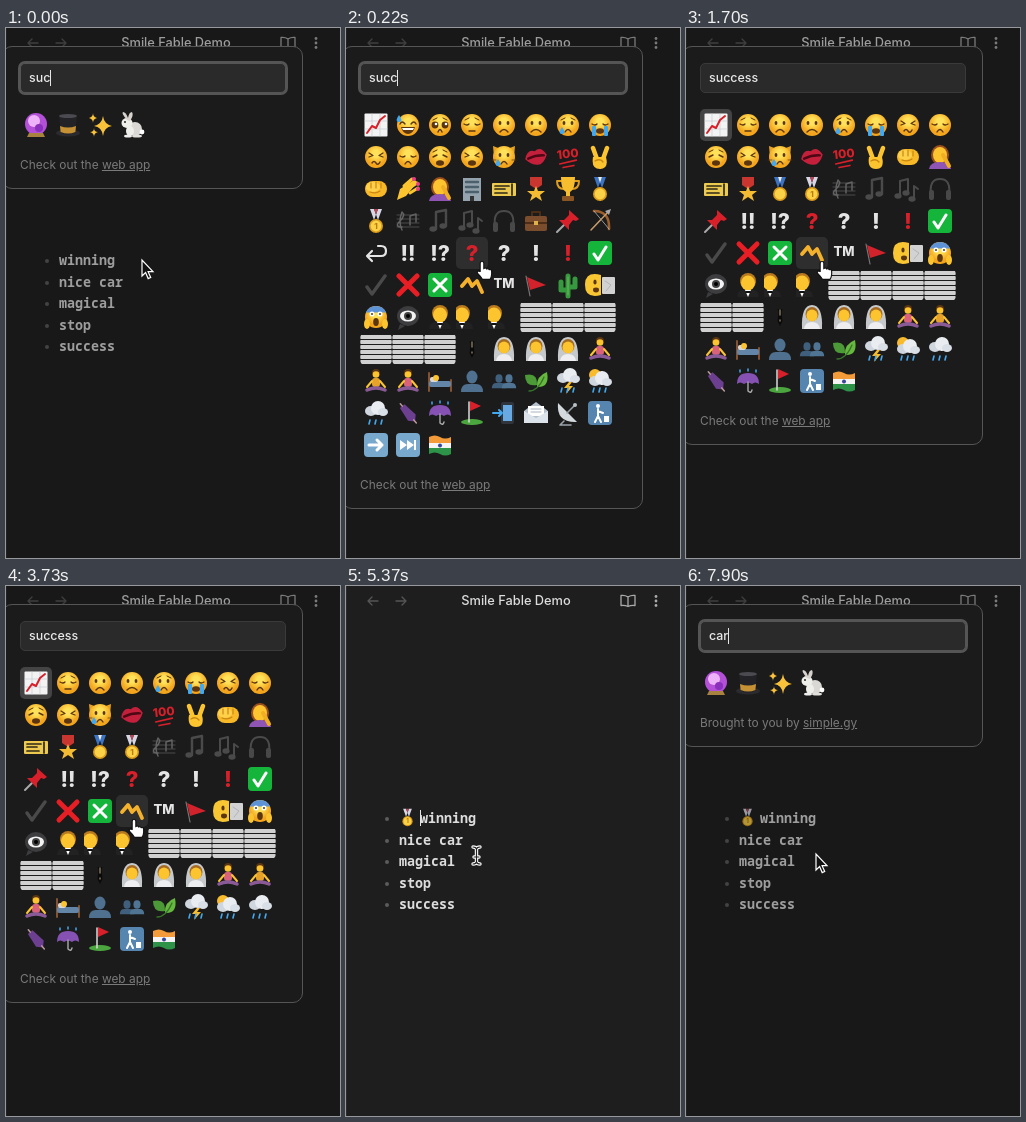
Recreate the animation shown at these times as an HTML page. Size 334 by 530 pixels, loop 8 s.

```html
<!DOCTYPE html>
<html lang="en">
<head>
<meta charset="utf-8">
<title>Emoji picker</title>
<style>
html, body { margin: 0; width: 100%; height: 100%; overflow: hidden; background: #1e1e1e; }
#stage { position: relative; width: 334px; height: 530px; overflow: hidden; background: #1e1e1e; font: 12.6px/16px Inter, sans-serif; color: #dcdcdc; }
#stage > *, #popup > * { position: absolute; }
#edge { left: 0; top: 0; width: 1px; height: 530px; background: #2c2c2c; }
#title { left: 70px; width: 200px; top: 7px; text-align: center; font-size: 12.8px; font-weight: 500; }
#icons { left: 0; top: 0; }
.row { left: 53px; height: 16px; font: 600 13.33px/16px "Noto Sans Mono", monospace; white-space: pre; }
.dot { left: 39px; width: 4px; height: 4px; border-radius: 2px; background: #5c5c5c; }
#medal { left: 52px; top: 222px; width: 19px; height: 19px; }
.caret { width: 1px; height: 16px; background: #e6e6e6; }
#dim { inset: 0; background: #0a0a0a; }
#popup { inset: 0; }
#panel { left: -4px; top: 18px; width: 299px; background: #1b1b1b; border: 1px solid #555; border-radius: 10px; }
#field { left: 14px; top: 35px; width: 256px; height: 28px; padding-left: 8px; border: 1px solid #3a3a3a; border-radius: 5px; background: #2a2a2a; font-size: 12.4px; font-weight: 500; line-height: 28px; color: #e8e8e8; white-space: pre; }
#field .caret { display: inline-block; vertical-align: middle; margin-top: -1px; }
#hint { color: #6a6a6a; font-weight: 400; }
#grid { left: 14px; top: 81px; width: 256px; display: flex; flex-wrap: wrap; }
#grid svg { width: 32px; height: 32px; border-radius: 5px; }
#grid .hover { background: #2e2e2e; }
#grid .focus { background: #444; }
#foot { left: 14px; font-size: 11.9px; color: #7a7a7a; white-space: pre; }
#pointer { left: 0; top: 0; overflow: visible; }
</style>
</head>
<body>
<div id="stage">
  <svg width="0" height="0"><defs><radialGradient id="sun" cy=".35"><stop offset=".3" stop-color="#ffe259"/><stop offset="1" stop-color="#f3a51d"/></radialGradient></defs></svg>
  <div id="edge"></div>
  <svg id="icons" width="334" height="30"></svg>
  <div id="title">Smile Fable Demo</div>
  <svg id="medal" viewBox="-13 -13 26 26"></svg>
  <div id="caret" class="caret"></div>
  <div id="dim"></div>
  <div id="popup">
    <div id="panel"></div>
    <div id="field"><span id="query"></span><span id="mark" class="caret"></span><span id="hint">Search for emojis by keyword</span></div>
    <div id="grid"></div>
    <div id="foot"></div>
  </div>
  <svg id="pointer" width="1" height="1"></svg>
</div>
<script>
const $ = id => document.getElementById(id);
const el = (tag, attrs, body = '') =>
  `<${tag} ${Object.entries(attrs).map(([k, v]) => `${k}="${v}"`).join(' ')}>${body}</${tag}>`;
const disc = (cx, cy, rx, fill, ry = rx) => el('ellipse', { cx, cy, rx, ry, fill });
const box = (x, y, width, height, fill, rx = 0) => el('rect', { x, y, width, height, fill, rx });
const shape = (d, fill) => el('path', { d, fill });
const line = (d, stroke, w = 2) => el('path', { d, stroke, fill: 'none', 'stroke-width': w, 'stroke-linecap': 'round', 'stroke-linejoin': 'round' });
const word = (s, fill, size = 22, y = 8) => el('text', { y, fill, 'text-anchor': 'middle', style: `font:800 ${size}px Inter,sans-serif` }, s);
const move = (x, y, body, more = '') => el('g', { transform: `translate(${x} ${y}) ${more}` }, body);

// emoji parts
const brown = '#5a3510', skin = '#fcc42f', blue = '#43a8ee', red = '#d8202b', pale = '#e4e4e4', dark = '#4a4a4a';
const face = (...parts) => disc(0, 0, 11, 'url(#sun)') + parts.join('');
const dots = disc(-4, -2, 1.4, brown, 1.9) + disc(4, -2, 1.4, brown, 1.9);
const shut = line('M-8-1q3 2 5 0M3-1q2 2 5 0', brown, 1.3);
const squint = line('M-7-4l4 2.5-4 1.5M7-4l-4 2.5 4 1.5', brown, 1.3);
const brows = line('M-7-5l4-2M7-5l-4-2', brown, 1);
const sad = w => line(`M${-w} 7q${w}-5 ${2 * w} 0`, brown, 1.4);
const gape = disc(0, 6, 4, brown, 2.8);
const tear = (x, y) => shape(`M${x} ${y}q-5 7 0 7t0-7z`, blue);
const medal = (ribbon, tip) => shape('M-6-12h4l4 11h-4zM6-12h-4l-4 11h4z', ribbon) + shape('M-2-12h4l-2 6z', tip) + disc(0, 5, 7, '#d99a1a') + disc(0, 5, 5.4, '#fbd147');
const suit = disc(0, -4, 8, '#b97a1d', 8) + disc(0, -2, 7, skin, 7.5) + shape('M-11 12q0-6 6-7h10q6 1 6 7z', '#222') + shape('M-3 5h6l-3 7z', '#fff') + line('M-2 7h4', '#111', 2);
const veil = shape('M-10 12Q-11-12 0-12T10 12z', '#c6c9cc') + disc(0, -3, 6.5, '#a36a20', 7) + disc(0, -1.5, 5.6, skin, 6) + shape('M-8 12q1-7 8-7t8 7z', '#eeeef0');
const yoga = top => disc(0, -8, 4, brown) + disc(0, -6.5, 3.3, skin) + box(-4, -3, 8, 9, top, 3) + line('M-4 0l-5 6M4 0l5 6', skin, 2) + line('M-9 9q9-4 18 0', '#8a5a97', 3.5);
const bust = (x, c, k = 1) => move(x, 0, disc(0, -4, 5.5, c, 6.5) + shape('M-11 11q0-8 7-8h8q7 0 7 8z', c), `scale(${k})`);
const cloud = (y = 0) => move(0, y, disc(-5, 0, 6, '#cfd6de', 5) + disc(2, -3, 7, '#e9edf2') + disc(7, 1, 5, '#d9dfe6', 4));
const drops = line('M-6 7l-1 4M0 7l-1 4M6 7l-1 4', blue, 1.6);
const tile = (c, body) => box(-12, -12, 24, 24, c, 4) + body;
const bars = [0, 1, 2, 3, 4, 5].map(i => box(-15.7, -14 + i * 5, 31.4, 4, '#d0d0d0', .8)).join('');
const stem = (x, y) => disc(x, y, 3.6, dark, 2.8);

const art = {
  ball: disc(0, -1, 11, '#b44fd8') + disc(-2, -4, 6, '#eeb2f8') + disc(3, 3, 4, '#8a30bd') + shape('M-7 8h14l2 4h-18z', '#a8823f'),
  hat: disc(0, 8, 12, '#2b2b2f', 3.6) + shape('M-9-9h18l-2 17q-7 3-14 0z', '#232327') + shape('M-8 1q8 3 16 0l-.6 6q-7 3-14.800 0z', '#c59134') + disc(0, -9, 9, '#4a4a50', 2),
  sparkles: shape('M3-9q1 8 9 10-8 1-9 10-1-9-9-10 8-2 9-10zM-7-12q0 4 4 5-4 1-4 5 0-4-4-5 4-1 4-5zM-6 3q0 4 4 4-4 1-4 5 0-4-4-5 4 0 4-4z', '#f9c23a'),
  rabbit: disc(3, 4, 7, '#dad8d4', 7) + disc(-5, -2, 5.5, '#eeeeea', 5) + shape('M-5-5q-6-7-4-8 3 0 5 6 1-6 4-6 2 3-2 9z', '#d8d2ce') + disc(-7, -3, 1, '#222') + disc(-2, 6, 4, '#eeeeea', 5) + disc(-4, 11, 4, '#eee', 1.6) + disc(10, 7, 2.4, '#fff') + disc(5, 11, 5, '#e2e0dc', 1.6),
  chart: box(-11.5, -11.5, 23, 23, '#f3f3f3', 1) + line('M-11-4h22M-11 4h22M-4-11v22M4-11v22', '#c4cbd2', .7) + line('M-9 8l5-7 4 2 4-8 5-4', red, 2),
  sweat: face(line('M-8-1q2-4 5 0M3-1q3-4 5 0', brown, 1.4), shape('M-7 2h14q-2 7-7 7t-7-7z', brown), shape('M-6 3h12l-1 2h-10z', '#fff'), tear(-9, -10)),
  plead: face(disc(-5, 0, 3.4, brown), disc(5, 0, 3.4, brown), disc(-4, -1, 1.3, '#fff'), disc(6, -1, 1.3, '#fff'), sad(2), brows),
  pensive: face(shut, line('M-3 6h6', brown, 1.4), brows),
  frown: face(dots, sad(4)),
  glum: face(dots, sad(5)),
  cry: face(dots, sad(3), tear(-6, 2), brows),
  sob: face(shut, gape, box(-8, 1, 4, 10, blue, 1), box(4, 1, 4, 10, blue, 1)),
  persevere: face(squint, line('M-4 6q2-3 4 0t4-1', brown, 1.4)),
  disappointed: face(shut, sad(3)),
  weary: face(line('M-7 0l4-2M7 0l-4-2', brown, 1.4), brows, gape),
  tired: face(squint, gape),
  cat: shape('M-11-11l8 3-7 8zM11-11l-8 3 7 8z', '#e8a21f') + face(dots, sad(3), tear(-6, 2), line('M-12 3h4M8 3h4', brown, .7)),
  kiss: move(0, 0, shape('M-11 0q4-10 11-6 7-4 11 6-5 9-11 8t-11-8z', '#c4203c') + line('M-8 0q8-2 16 0', '#4d0814', 2.4), 'rotate(-12)'),
  hundred: move(0, 0, word('100', red, 12, 1) + line('M-9 6l17-2M-6 10l11-1', red, 1.6), 'rotate(-6)'),
  peace: line('M-3 2l-4-11M3 2l4-11', skin, 4.5) + shape('M-7 0h13q3 12-6 12t-7-12z', skin) + line('M-5 4q5-3 8 1', '#c98714', 1.4),
  fist: box(-11, -8, 22, 16, '#f8b928', 8) + disc(-3, -2, 7, '#ffd04a', 5) + line('M-5-6v5M0-7v6M5-6v5M-6 3q6 2 10-1', '#c98714', 1.2),
  nails: shape('M-11 11l3-11 14-9q5 1 1 5l-9 11z', skin) + line('M-4-3l8-7M0 0l9-6M2 4l8-5', skin, 3) + disc(6, -10, 2, '#e83e8c') + disc(10, -5, 2, '#e83e8c') + disc(10, 0, 2, '#e83e8c'),
  palm: disc(0, -2, 9, '#9a4e1c', 10) + disc(0, -2, 7, skin, 8) + shape('M-11 12q1-7 11-7t11 7z', '#8e55b5') + line('M9 9L3-2', '#f0ae22', 4),
  office: box(-9, -11, 18, 23, '#94a3ad') + line('M-6-7h12M-6-2h12M-6 3h12', '#4c606e', 2.4) + box(-2, 7, 4, 5, '#333'),
  ticket: box(-12, -6, 24, 13, '#ecc94f', 1) + line('M-9-3h14M-9 0h10M-9 4h12M8-5v11', '#2e2917', 1.7),
  military: shape('M-6-12h12v8l-6 4-6-4z', '#c9352f') + shape('M0-3l2 5 7 0-5 4 2 6-6-4-6 4 2-6-5-4h7z', '#f4bc32'),
  trophy: line('M-6-8h-5q0 8 7 8M6-8h5q0 8-7 8', '#dc9d1e', 2) + shape('M-7-12h14q0 13-5 15v4h-4v-4q-5-2-5-15z', '#f6bd2f') + box(-6, 7, 12, 5, '#8a5523', 1),
  sports: medal('#3b74c4', '#e8eef5'),
  gold: medal('#d5d8e4', '#b8475a') + move(0, 5, word('1', '#bb7d10', 8, 3)),
  score: line('M-11-6h22M-11-2h22M-11 2h22M-11 6h22', dark, 1) + line('M-6 9q-4-8 0-18 4 3-2 9t2 6M2 4v-9l6-2v8', '#626262', 1.5),
  note: line('M-4 8V-9l10-2V5', dark, 2.4) + stem(-7, 8) + stem(3, 5),
  notes: line('M-8 7V-8l8-2V4M6 10V-3l4 3', dark, 2) + stem(-10, 7) + stem(-2, 4) + stem(4, 10),
  phones: line('M-9 5q-2-15 9-15t9 15', dark, 2) + box(-11, 1, 5, 10, '#484848', 2) + box(6, 1, 5, 10, '#484848', 2),
  case: line('M-4-5v-4h8v4', '#4b2c14') + box(-11, -5, 22, 15, '#7c4d2d', 2) + box(-11, 1, 22, 2, '#4d2d18') + box(-2, 0, 4, 4, '#e0b04a'),
  pin: line('M-3 3l-8 8', '#aaa') + shape('M1-11l10 9-3 2-3-1-4 5 0 5-10-10 5 0 5-5z', red),
  bow: line('M-6-10Q10-10 9 8', '#9a5f2c', 2.6) + line('M-6-10L9 8', '#ccc', .7) + line('M-9 9L8-9', '#c69b6a', 1.5) + shape('M11-12l-6 2 4 4z', '#aaa'),
  return: line('M-9 3H5q5 0 5-5t-5-5H2M-4-2l-5 5 5 5', pale, 2.2),
  bangs: word('!!', pale, 21), interro: word('!?', pale, 21),
  redq: word('?', red), whiteq: word('?', pale), whitebang: word('!', pale), redbang: word('!', red),
  yes: tile('#15b53c', line('M-6 1l4 6 8-13', '#fff', 3)),
  tick: line('M-9 2l5 7L9-9', dark, 3.4),
  cross: line('M-9-9L9 9M9-9L-9 9', '#e81e25', 5),
  no: tile('#15b53c', line('M-6-6L6 6M6-6L-6 6', '#fff', 3)),
  part: line('M-10 1l6-7 4 7 5-5 5 11', '#f4b12c', 3.8),
  tm: word('TM', pale, 13, 3),
  flag: line('M-10-9l4 20', '#777', 1.2) + shape('M-9-8l19 8-16 5z', '#d2222c'),
  cactus: line('M0 11V-9M0 5h-7v-8M0 2h7v-8', '#36983f', 5) + line('M0 10V-8', '#70bd55', 1),
  half: shape('M1-10Q-15-14-15 0T1 10z', '#f8c533') + disc(-5, -3, 1.6, brown, 2.6) + disc(-4, 5, 3, brown, 2.4) + box(2, -8, 13, 17, '#d2d2d2', 1) + line('M5-4l6 4-5 6', '#b4b4b4', 1),
  scream: face(shape('M-10-4.500A11 11 0 0 1 10-4.500z', '#5f93d8'), disc(-4, -3, 2.5, '#fff'), disc(4, -3, 2.5, '#fff'), disc(-4, -3, 1, brown), disc(4, -3, 1, brown), disc(0, 5, 2.8, brown, 4), disc(-9, 7, 3, skin, 5), disc(9, 7, 3, skin, 5)),
  eye: disc(0, -1, 11, '#3d3d3f', 10) + shape('M-8 7l-2 6 7-4z', '#3d3d3f') + disc(0, -1, 8, '#f3f3f3', 5.5) + disc(0, -1, 4, '#444') + disc(0, -1, 2, '#000'),
  suit, suitLeft: move(-10, 0, suit), bars,
  tie: shape('M-2.5-8h5l-1 3 1 9-2.500 5-2.500-5 1-9z', '#0a0a0a') + line('M0-7v5M0 3v1', '#8a7a60', 1.4),
  veil, yogaA: yoga('#d8627c'), yogaB: yoga('#e6a22a'),
  bed: line('M-11-8v18M11-1v11', '#855331') + box(-11, 0, 22, 6, '#6285a8', 2) + box(-10, -4, 8, 5, '#d8d8da', 2) + disc(-4, -3, 3, skin),
  bust: bust(0, '#4f718f'), busts: bust(-5, '#3f5f7c', .65) + bust(5, '#507594', .65),
  leaf: shape('M-11-6q13-3 12 10-12 2-12-10z', '#4b9a37') + shape('M11-9q3 16-10 15-1-11 10-15z', '#66b83e') + line('M-7 10q9 0 15-14', '#36752a', 1.3),
  storm: cloud(-3) + shape('M1 1l-5 6h4l-2 6 7-8h-4l3-4z', '#f8bd2b') + drops,
  shower: disc(-5, -6, 6, '#f9bb2c') + cloud() + drops,
  rain: cloud(-2) + drops,
  brolly: move(0, 0, shape('M-3-9h6l2 15-5 5-5-5z', '#6d3f91') + line('M0-9v-3M0 9v4', '#b99', 1.5), 'rotate(-40)'),
  umbrella: shape('M-11 3q0-11 11-11T11 3q-4-3-7 0-4-3-8 0-4-3-7 0z', '#8552b3') + line('M0 1v9q3 3 4-1', '#aaa', 1.4) + line('M-8-9v-2M0-10v-2M8-9v-2', blue, 1.5),
  golf: disc(0, 9, 11, '#4ba63f', 3) + line('M-3 9v-20', '#ddd', 1.5) + shape('M-2-12l11 5-11 5z', red),
  mobile: box(-3, -11, 13, 22, '#30343b', 2) + box(-1, -8, 9, 16, '#67a9e0') + line('M-11 0h9M-5-3l3 3-3 3', blue, 2),
  mail: shape('M-12-2l12-9 12 9v12h-24z', '#b5c0cd') + box(-8, -7, 16, 10, '#fff') + line('M-5-4H5M-5-1H5', '#a9b4c0', 1) + shape('M-12-2l12 7 12-7v12h-24z', '#dce3ea'),
  dish: shape('M-10-10Q-12 10 9 9z', '#d4d9dd') + line('M-1 0l8-8M-4 8l-4 4h11', '#9aa2aa', 1.6) + disc(7, -8, 2, '#b9bfc5'),
  bin: tile('#5685b0', disc(-2, -7, 2, '#fff') + line('M-2-4v7l-3 6M-2 3l3 6M-2-2l5 2', '#fff') + box(4, 3, 5, 6, '#fff')),
  right: tile('#78a9cd', line('M-7 0h13M1-5l5 5-5 5', '#fff', 3)),
  skip: tile('#78a9cd', shape('M-8-5l7 5-7 5zM-1-5l7 5-7 5z', '#fff') + box(6, -5, 2, 10, '#fff')),
  india: shape('M-11-8q6-3 11 0t11 0v6h-22z', '#f29b38') + box(-11, -2, 22, 5, '#f4f4f4') + shape('M-11 3h22v6q-6 3-11 0t-11 0z', '#2d9348') + disc(0, .5, 2, '#34479b')
};

// result lists
const magic = 'ball hat sparkles rabbit'.split(' ');
const succ = ('chart sweat plead pensive frown glum cry sob persevere disappointed weary tired cat kiss hundred peace ' +
  'fist nails palm office ticket military trophy sports gold score note notes phones case pin bow ' +
  'return bangs interro redq whiteq whitebang redbang yes tick cross no part tm flag cactus half ' +
  'scream eye suit suitLeft suitLeft bars bars bars bars bars bars tie veil veil veil yogaA ' +
  'yogaB yogaA bed bust busts leaf storm shower rain brolly umbrella golf mobile mail dish bin right skip india').split(' ');
const dropped = 'sweat plead nails office trophy case bow return cactus mobile mail dish right skip'.split(' ');
const success = succ.filter(n => !dropped.includes(n));
const suc = [...succ, ...succ.slice(1, 17)];

// timelines: [ms, value...]
const queries = [[0, 'suc'], [220, 'succ'], [280, 'succe'], [400, 'succes'], [510, 'success'], [4480, ''], [7730, 'c'], [7810, 'ca'], [7900, 'car']];
const results = [[0, magic], [110, suc], [220, succ], [280, success], [4480, magic]];
const focused = [[0, -1], [1640, 0], [4360, 19], [4480, -1]];
const rings = [[0, 1], [1640, .5], [1700, 0], [7260, .3], [7320, .6], [7380, 1]];
const marks = [[0, 1], [990, 0], [1470, 1], [1640, 0], [7260, 1]];
const dims = [[0, .3], [4480, 0], [7260, .15], [7320, .22], [7380, .3]];
const carets = [[0, 0], [4480, 66, 224], [5010, 0], [5370, 74, 224], [5660, 77, 246], [5780, 69, 246], [5950, 61, 246], [6250, 53, 246], [6720, 0]];
const starts = [[0, 53], [4480, 66], [5370, 74]];
const path = [[0, 136, 233], [3700, 136, 233], [3730, 128, 233], [4340, 118, 159], [4480, 118, 159], [5010, 130, 269], [8000, 130, 269]];
const at = (table, t) => table.findLast(s => s[0] <= t);

const cursors = {
  arrow: el('path', { d: 'M0-1V15l3.6-3.4 2.6 6 2.5-1.1-2.6-5.8H11z', fill: '#111', stroke: '#fff', 'stroke-width': 1.2 }),
  hand: el('path', { d: 'M-1.6 9V2a1.6 1.6 0 0 1 3.2 0V6.5q1.5-1 2.4.4 1.6-.8 2.3.6 2-.6 2.1 1.5v2.6q0 2-1.4 4.4H.5q-1-2-4.5-5.5-.6-2.4 2.4-1.5z', transform: 'scale(1.15)', fill: '#fff', stroke: '#111', 'stroke-width': 1 }),
  beam: [['#fff', 3.4], ['#222', 1.2]].map(([c, w]) => line('M-3-8q3 0 3.5 2 .5-2 3.5-2M.5-6V7M-3 9q3 0 3.5-2 .5 2 3.5 2M-2 2h5', c, w)).join('')
};

$('icons').innerHTML = line('M32 15H22M26 11l-4 4 4 4M50 15h10M56 11l4 4-4 4', '#555', 1.3) +
  line('M282 11q-3-2-7-1.5v10q4-.5 7 1 3-1.5 7-1v-10q-4-.5-7 1.5zv9', '#aaa', 1.3) +
  [10.5, 15, 19.5].map(y => disc(310, y, 1.4, '#aaa')).join('');
$('medal').innerHTML = art.gold;
const rows = ['winning', 'nice car', 'magical', 'stop', 'success'].map((text, i) => {
  const y = 224 + Math.round(i * 21.6);
  $('caret').insertAdjacentHTML('beforebegin', `<div class="dot" style="top:${y + 7}px"></div><div class="row" style="top:${y}px">${text}</div>`);
  return $('caret').previousElementSibling;
});

const show = (node, on) => { node.style.display = on ? '' : 'none'; };
let shown, kind, foot;

function pointerAt(t) {
  const i = path.findLastIndex(s => s[0] <= t);
  const [t0, x0, y0] = path[i], [t1, x1, y1] = path[i + 1];
  const u = (t - t0) / (t1 - t0), k = u * u * (3 - 2 * u);
  return [Math.round(x0 + (x1 - x0) * k), Math.round(y0 + (y1 - y0) * k)];
}

function render(t) {
  const open = t < 4480 || t >= 7260;
  const list = at(results, t)[1], query = at(queries, t)[1];
  const [x, y] = pointerAt(t);
  const extra = 32 * (Math.ceil(list.length / 8) - 1);

  show($('popup'), open);
  $('dim').style.opacity = at(dims, t)[1];
  if (shown !== list) {
    shown = list;
    $('grid').innerHTML = list.map(n => el('svg', { viewBox: '-16 -16 32 32' }, art[n])).join('');
    $('panel').style.height = 141 + extra + 'px';
    $('foot').style.top = 129 + extra + 'px';
  }
  const col = Math.floor((x - 14) / 32), row = Math.floor((y - 81) / 32);
  const hover = open && row >= 0 && col >= 0 && col < 8 ? row * 8 + col : -1;
  const focus = at(focused, t)[1];
  [...$('grid').children].forEach((cell, i) => cell.setAttribute('class', i === focus ? 'focus' : i === hover ? 'hover' : ''));

  const ring = at(rings, t)[1];
  $('field').style.boxShadow = `0 0 0 ${2 * ring}px #555`;
  $('field').style.borderColor = ring ? '#555' : '#3a3a3a';
  $('query').textContent = query;
  $('mark').style.visibility = at(marks, t)[1] ? 'visible' : 'hidden';
  show($('hint'), !query);
  const words = t < 4480 ? 'Check out the <u>web app</u>' : 'Brought to you by <u>simple.gy</u>';
  if (foot !== words) $('foot').innerHTML = foot = words;

  const [, cx, cy] = at(carets, t);
  show($('caret'), cx);
  $('caret').style.left = cx + 'px';
  $('caret').style.top = cy + 'px';
  rows[0].style.left = at(starts, t)[1] + 'px';
  show($('medal'), t >= 4480);

  const next = !open ? 'beam' : hover >= 0 && hover < list.length ? 'hand' : 'arrow';
  if (kind !== next) $('pointer').innerHTML = cursors[kind = next];
  $('pointer').style.transform = `translate(${x}px, ${y}px)`;
}

const begin = performance.now();
function tick() {
  render((performance.now() - begin) % 8000);
  requestAnimationFrame(tick);
}
tick();
</script>
</body>
</html>
```
